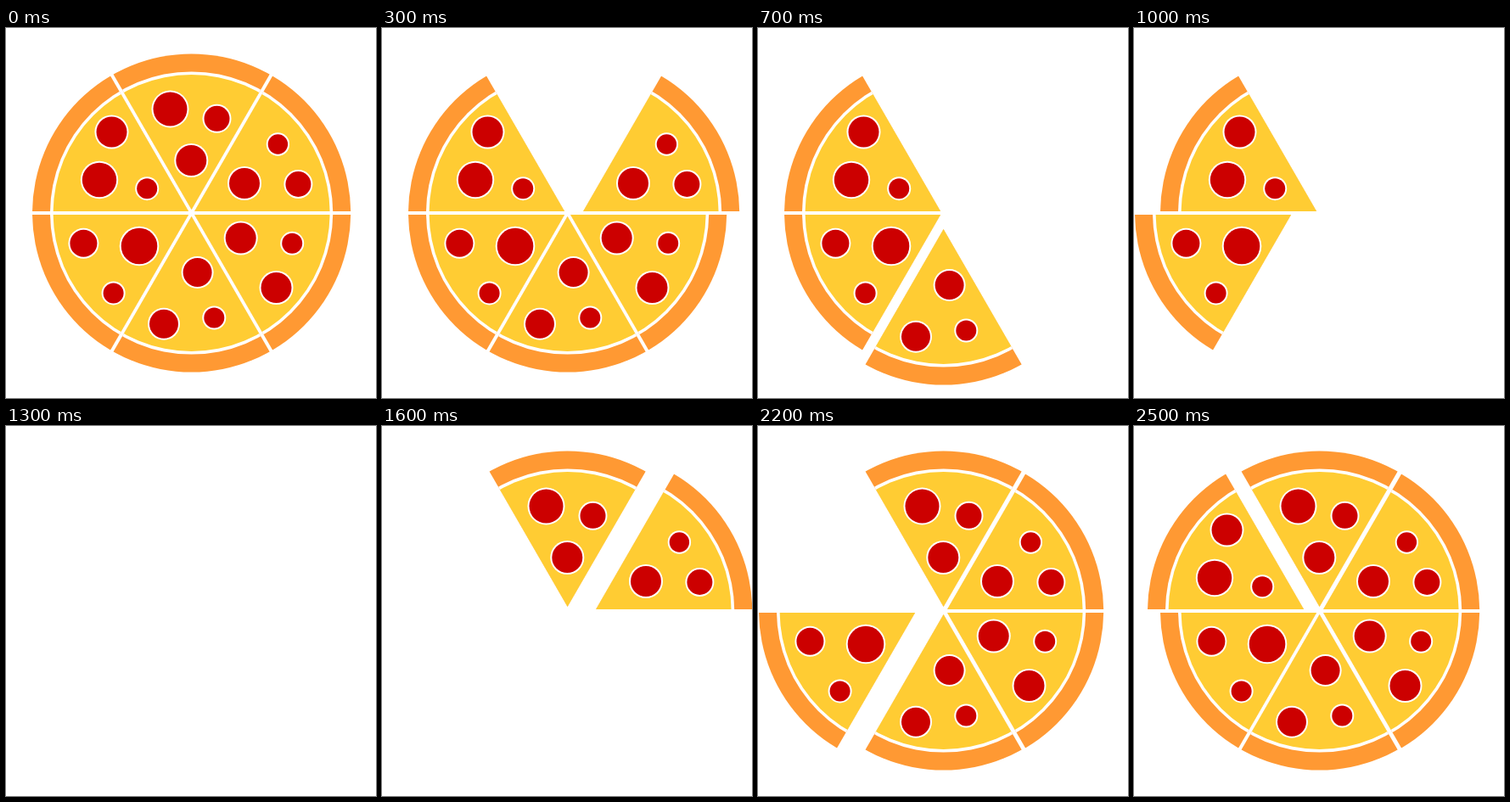
Recreate the animation shown at these times as an HTML page with a canvas. Size 436x436 px, loop 2600 ms.

```html
<!DOCTYPE html>
<html lang="en">
<head>
<meta charset="utf-8">
<title>Pizza loop</title>
<style>
html, body { margin: 0; width: 100%; height: 100%; overflow: hidden; background: #fff; }
canvas { display: block; width: 436px; height: 436px; }
</style>
</head>
<body>
<canvas id="stage" width="436" height="436"></canvas>
<script>
const ctx = document.getElementById('stage').getContext('2d');
const CX = 218.6, CY = 218;
const STEP = 100, STEPS = 26, SHIFT = 15;
const HALF_GAP = 2;

// Clockwise from the top: slide direction, resting nudge after return, toppings [x, y, r]
const slices = [
  { dx: 0, dy: -1, rest: 1, dots: [[193.5, 95.5, 20], [248.5, 106.8, 15], [218.3, 156, 18]] },
  { dx: 1, dy: 0, rest: 1, dots: [[320.4, 137, 11.7], [281, 183, 18], [344.4, 184, 15]] },
  { dx: 1, dy: 0, rest: 1, dots: [[276.7, 247.5, 18], [337.2, 253.8, 12], [318.5, 306, 18]] },
  { dx: 0, dy: 1, rest: 0, dots: [[225.6, 288, 17], [186, 348.8, 17], [245.3, 341.5, 12]] },
  { dx: -1, dy: 0, rest: 0, dots: [[91.4, 253.8, 16], [157, 257, 21.3], [126.6, 312.4, 12]] },
  { dx: -1, dy: 0, rest: 0, dots: [[124.5, 122.5, 18], [110, 179, 20.2], [166.2, 189.2, 12]] }
];

function disc(x, y, r, color) {
  ctx.fillStyle = color;
  ctx.beginPath();
  ctx.arc(x, y, r, 0, Math.PI * 2);
  ctx.fill();
}

function clipWedge(mid) {
  const half = Math.PI / 6, reach = 260;
  const tip = HALF_GAP / Math.sin(half);
  const x = CX + tip * Math.cos(mid), y = CY + tip * Math.sin(mid);
  ctx.beginPath();
  ctx.moveTo(x, y);
  for (const a of [mid - half, mid + half]) {
    ctx.lineTo(x + reach * Math.cos(a), y + reach * Math.sin(a));
  }
  ctx.closePath();
  ctx.clip();
}

function drawSlice(slice, i, offset) {
  ctx.save();
  ctx.translate(slice.dx * offset, slice.dy * offset);
  clipWedge(-Math.PI / 2 + i * Math.PI / 3);
  disc(CX, CY, 187.6, '#ff9933');
  disc(CX, CY, 166.6, '#fff');
  disc(CX, CY, 163, '#ffcc33');
  for (const [x, y, r] of slice.dots) {
    disc(x, y, r + 2, '#fff');
    disc(x, y, r, '#cc0000');
  }
  ctx.restore();
}

// Distance of slice i from its place, or null while it is away
function offsetAt(step, i) {
  const out = step - 2 * i;
  if (out <= 2) return Math.max(0, out) * SHIFT;
  const back = 16 + 2 * i - step;
  if (back > 2) return null;
  return back > 0 ? back * SHIFT : slices[i].rest;
}

function frame(now) {
  const step = Math.floor(now / STEP) % STEPS;
  ctx.fillStyle = '#fff';
  ctx.fillRect(0, 0, 436, 436);
  slices.forEach((slice, i) => {
    const offset = offsetAt(step, i);
    if (offset !== null) drawSlice(slice, i, offset);
  });
  requestAnimationFrame(() => frame(performance.now() - start));
}

const start = performance.now();
frame(0);
</script>
</body>
</html>
```
